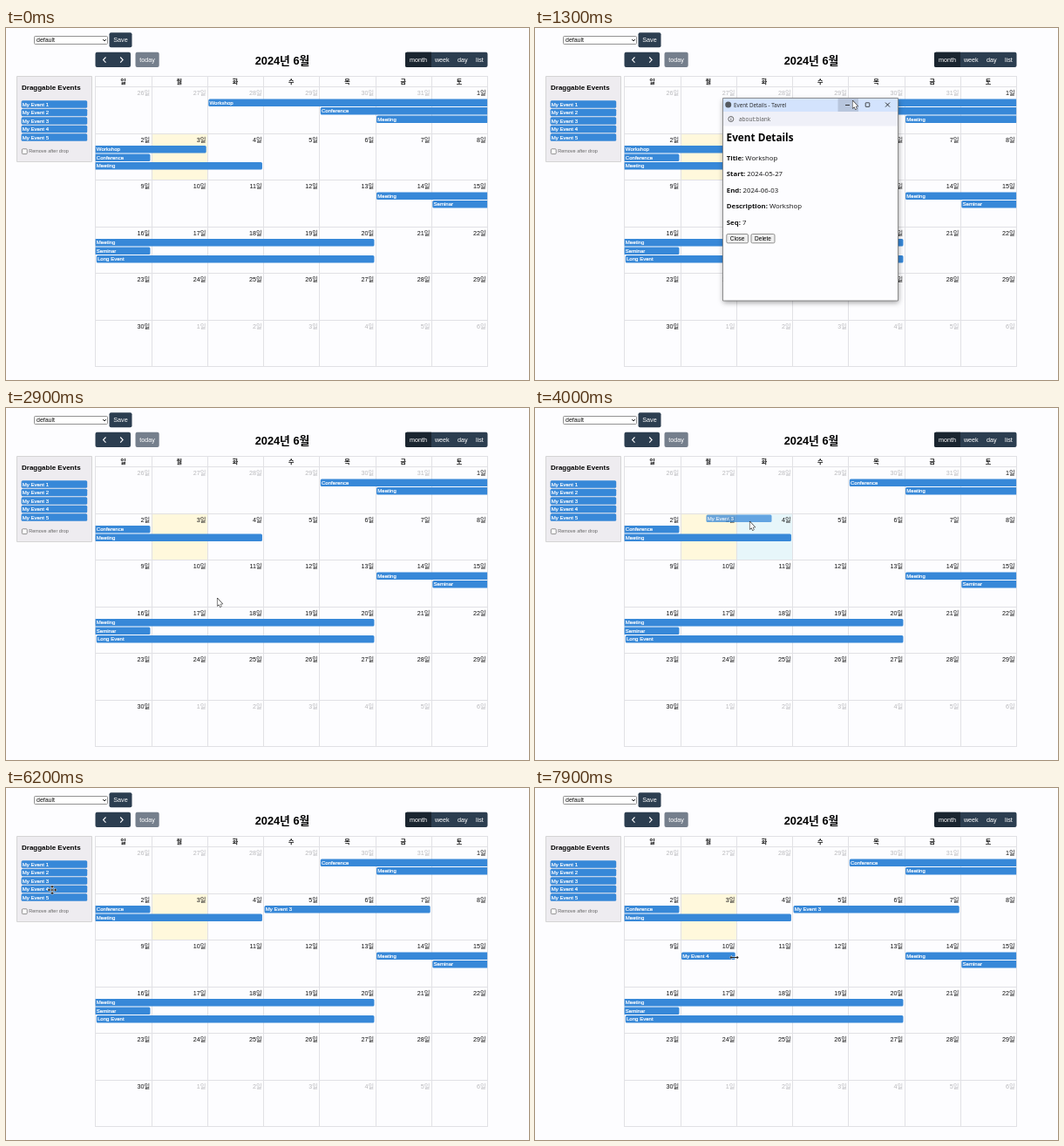
Animation, 600 px wide and 404 px high, one loop 8000 ms. Source, as an HTML page with a canvas:

```html
<!DOCTYPE html>
<html lang="ko">
<head>
<meta charset="utf-8">
<title>Calendar</title>
<style>
html, body { margin: 0; width: 100%; height: 100%; overflow: hidden; background: #fdfdff; }
canvas { display: block; width: 600px; height: 404px; }
</style>
</head>
<body>
<canvas id="stage"></canvas>
<script>
const LOOP = 8000, STEP = 100;
const SANS = '"Liberation Sans", "Noto Sans CJK KR", "Noto Sans CJK JP", sans-serif';
const UI = '"Open Sans", "Noto Sans", sans-serif';
const BG = '#fdfdff', NAVY = '#2c3e50', BLUE = '#3788d8', LINE = '#e1e1e5';
const LEFT = 102.4, TOP = 67.2, COL = 64.25, ROW = 53.5;
const BAR = 8.6, LANE = 9.5;

const canvas = document.getElementById('stage');
const ctx = canvas.getContext('2d');
const dpr = window.devicePixelRatio || 1;
canvas.width = 600 * dpr;
canvas.height = 404 * dpr;
ctx.scale(dpr, dpr);

// Pointer path: time, x, y, shape
const POINTER = [
  [100, 455, 70, 'arrow'], [400, 420, 86, 'arrow'], [700, 515, 62, 'arrow'],
  [900, 476, 68, 'arrow'], [1000, 476, 68, 'arrow'], [1200, 361, 88, 'arrow'],
  [1300, 364, 83, 'arrow'], [1900, 303, 176, 'arrow'], [2500, 259, 237, 'arrow'],
  [2600, 259, 237, 'arrow'], [2900, 242, 218, 'arrow'], [3100, 128, 153, 'arrow'],
  [3200, 128, 153, 'arrow'], [3600, 54, 109, 'move'], [3700, 54, 109, 'move'],
  [3800, 80, 112, 'arrow'], [4000, 246, 130, 'arrow'], [4300, 345, 139, 'arrow'],
  [4600, 362, 140, 'arrow'], [5000, 356, 140, 'resize'], [5100, 356, 140, 'resize'],
  [5600, 482, 140, 'resize'], [5700, 440, 147, 'arrow'], [6000, 267, 175, 'arrow'],
  [6200, 53, 117, 'move'], [6300, 53, 117, 'move'], [6400, 72, 122, 'arrow'],
  [6900, 178, 178, 'arrow'], [7200, 216, 190, 'arrow'], [7400, 221, 191, 'arrow'],
  [7700, 229, 194, 'resize'], [7800, 229, 194, 'resize'], [7900, 228.5, 194.5, 'resize']
];
const POPUP = [[500, 369, 54], [700, 369, 54], [900, 330, 60], [1000, 330, 60], [1200, 215, 80]];
const DRAGS = [
  { label: 'My Event 3', from: 3800, to: 4400,
    path: [[3800, 40, 104], [4000, 196.5, 122.4], [4200, 285, 130], [4300, 300, 132]] },
  { label: 'My Event 4', from: 6400, to: 7400,
    path: [[6400, 36, 114], [6900, 121, 140], [7200, 175, 182], [7300, 178, 184]] }
];

function along(path, t) {
  let i = 0;
  while (i < path.length - 2 && t >= path[i + 1][0]) i++;
  const a = path[i], b = path[i + 1];
  const k = Math.min(1, Math.max(0, (t - a[0]) / (b[0] - a[0])));
  return { x: a[1] + (b[1] - a[1]) * k, y: a[2] + (b[2] - a[2]) * k, shape: k === 1 ? b[3] : a[3] };
}

function box(x, y, w, h, fill, r = 0, stroke) {
  ctx.beginPath();
  ctx.roundRect(x, y, w, h, r);
  if (fill) { ctx.fillStyle = fill; ctx.fill(); }
  if (stroke) { ctx.strokeStyle = stroke; ctx.lineWidth = 0.8; ctx.stroke(); }
}

function text(str, x, y, size, { color = '#111', align = 'left', weight = 400, family = SANS, heavy = 0 } = {}) {
  ctx.font = `${weight} ${size}px ${family}`;
  ctx.textAlign = align;
  ctx.fillStyle = color;
  ctx.fillText(str, x, y);
  if (heavy) {
    ctx.strokeStyle = color;
    ctx.lineWidth = heavy;
    ctx.strokeText(str, x, y);
  }
  return ctx.measureText(str).width;
}

function line(points, color, width = 1) {
  ctx.beginPath();
  points.forEach(([x, y], i) => i ? ctx.lineTo(x, y) : ctx.moveTo(x, y));
  ctx.strokeStyle = color;
  ctx.lineWidth = width;
  ctx.stroke();
}

const snap = v => Math.round(v) + 0.5;
const cellX = c => LEFT + c * COL;
const cellY = r => TOP + r * ROW;

function label(str, x, y) {
  text(str, x + 1.2, y + 6.3, 6.05, { color: '#fff', heavy: 0.2 });
}

function toolbar() {
  box(32.5, 9.5, 84, 9, '#fff', 1, '#767676');
  text('default', 35, 16.4, 7);
  line([[111.2, 13], [113, 15], [114.8, 13]], '#222', 1);
  const caption = (str, x, y = 39) => text(str, x, y, 7.2, { color: '#fff', align: 'center' });
  box(118.5, 5.3, 26, 17, NAVY, 2);
  caption('Save', 131.5, 16.4);
  box(102.5, 27.7, 40.5, 17.2, NAVY, 2);
  line([[114.5, 33.5], [111.6, 36.6], [114.5, 39.7]], '#fff', 1.1);
  line([[131.2, 33.5], [134.1, 36.6], [131.2, 39.7]], '#fff', 1.1);
  box(148.5, 27.7, 27.2, 17.2, '#757f8c', 2);
  caption('today', 162.1);
  text('2024년 6월', 317, 41.5, 12.8, { weight: 700, align: 'center', color: '#000' });
  box(458, 27.7, 94.5, 17.2, NAVY, 2);
  box(458, 27.7, 30, 17.2, '#1a252f', [2, 0, 0, 2]);
  caption('month', 473);
  caption('week', 500.3);
  caption('day', 523.7);
  caption('list', 543.4);
}

function sidebar() {
  box(12.5, 55.5, 86, 98, '#eeecf0', 0, '#ccc');
  text('Draggable Events', 18, 71, 8, { weight: 700, color: '#000' });
  for (let i = 0; i < 5; i++) {
    const y = 83.2 + i * 9.5;
    box(17.6, y, 75.6, BAR, BLUE, 1.5);
    label('My Event ' + (i + 1), 17.6, y);
  }
  box(18.4, 138.8, 5.8, 5.8, '#fff', 1, '#767676');
  text('Remove after drop', 26.2, 143.4, 5.5, { color: '#666' });
}

function grid(hot) {
  box(cellX(1), cellY(1), COL, ROW, '#fff8dc');
  if (hot) box(cellX(hot.col), cellY(hot.row), COL, ROW, 'rgba(188,232,241,.35)');
  for (let i = 0; i <= 7; i++) {
    const x = snap(cellX(i)), y = i < 7 ? snap(cellY(i)) : 55.5;
    line([[x, 55], [x, 389]], LINE);
    line([[102, y], [553, y]], LINE);
  }
  [...'일월화수목금토'].forEach((d, c) =>
    text(d, cellX(c + 0.5), 64.4, 7, { weight: 700, align: 'center' }));
  for (let i = 0; i < 42; i++) {
    const n = i - 5, other = n < 1 || n > 30;
    const day = n < 1 ? n + 31 : n > 30 ? n - 30 : n;
    text(day + '일', cellX(i % 7 + 1) - 1.5, cellY(Math.floor(i / 7)) + 9.8, 7.2,
      { align: 'right', color: other ? '#b9b9bc' : '#111' });
  }
}

// Bar over columns a..b; open ends run on into the neighbouring week
function bar(name, row, lane, a, b, openStart, openEnd) {
  const x = cellX(a) + (openStart ? 0.2 : 1.4);
  const end = cellX(b + 1) - (openEnd ? 0 : 1.2);
  const l = openStart ? 0 : 1.5, r = openEnd ? 0 : 1.5;
  const y = cellY(row) + 14.3 + lane * LANE;
  box(x, y, end - x, BAR, BLUE, [l, r, r, l]);
  label(name, x, y);
}

function events(t, pointer) {
  const full = t < 2700, up = full ? 1 : 0;
  if (full) {
    bar('Workshop', 0, 0, 2, 6, false, true);
    bar('Workshop', 1, 0, 0, 1, true, false);
  }
  bar('Conference', 0, up, 4, 6, false, true);
  bar('Meeting', 0, up + 1, 5, 6, false, true);
  bar('Conference', 1, up, 0, 0, true, false);
  bar('Meeting', 1, up + 1, 0, 2, true, false);
  bar('Meeting', 2, 0, 5, 6, false, true);
  bar('Seminar', 2, 1, 6, 6, false, true);
  bar('Meeting', 3, 0, 0, 4, true, false);
  bar('Seminar', 3, 1, 0, 0, true, false);
  bar('Long Event', 3, 2, 0, 4, false, false);
  if (t >= 4400) {
    const last = t < 5200 ? 3 : t > 5600 ? 5 : Math.floor((pointer.x - LEFT) / COL);
    bar('My Event 3', 1, 0, 3, last, false, false);
  }
  if (t >= 7400) bar('My Event 4', 2, 0, 1, 1, false, false);
}

function popup(t) {
  const p = along(POPUP, t);
  ctx.save();
  ctx.translate(p.x, p.y);
  ctx.shadowColor = 'rgba(0,0,0,.4)';
  ctx.shadowBlur = 6 * dpr;
  ctx.shadowOffsetY = 2 * dpr;
  box(0.5, 0.5, 201, 232.5, BG);
  ctx.shadowColor = 'transparent';
  box(0.5, 0.5, 201, 15.5, '#d3e3fd');
  if (t >= 1200 && t < 1400) box(132.5, 0.8, 23.5, 15.2, '#b8c6dd');
  box(0.5, 16, 201, 16.5, '#eff0f8');
  box(0.5, 0.5, 201, 232.5, null, 0, '#777');

  box(3.2, 4.4, 7, 7, '#555a60', 3.5);
  text('Event Details - Tavrel', 13, 10.7, 6.3, { family: UI, color: '#222' });
  line([[141, 8.5], [146, 8.5]], '#222', 0.9);
  box(164.2, 5.8, 4.6, 4.6, null, 0.5, '#222');
  line([[187, 5.6], [192, 10.6]], '#222', 0.9);
  line([[192, 5.6], [187, 10.6]], '#222', 0.9);
  box(6.8, 21.5, 6, 6, null, 3, '#444');
  line([[9.8, 24.2], [9.8, 26.3]], '#444', 0.8);
  line([[9.8, 22.8], [9.8, 23.5]], '#444', 0.8);
  text('about:blank', 19, 27, 6.5, { family: UI, color: '#555' });

  text('Event Details', 4.6, 50.3, 11.75, { family: UI, weight: 700, color: '#000' });
  [['Title:', 'Workshop'], ['Start:', '2024-05-27'], ['End:', '2024-06-03'],
    ['Description:', 'Workshop'], ['Seq:', '7']].forEach(([key, value], i) => {
    const y = 71.6 + i * 18.5;
    const w = text(key + ' ', 4.8, y, 7.8, { family: UI, weight: 700 });
    text(value, 4.8 + w, y, 7.8, { family: UI });
  });
  for (const [name, x, w] of [['Close', 4.8, 24.7], ['Delete', 33, 27]]) {
    box(x, 156.5, w, 10.3, '#efefef', 1.5, '#767676');
    text(name, x + w / 2, 164, 6.5, { align: 'center', color: '#000' });
  }
  ctx.restore();
}

function mirror(drag, t) {
  const p = along(drag.path, t);
  ctx.globalAlpha = 0.75;
  box(p.x, p.y, 75, BAR, BLUE, 1.5);
  label(drag.label, p.x, p.y);
  ctx.globalAlpha = 1;
}

function shape(path, fill, stroke, width) {
  const p = new Path2D(path);
  ctx.lineJoin = 'round';
  ctx.strokeStyle = stroke;
  ctx.lineWidth = width;
  ctx.stroke(p);
  ctx.fillStyle = fill;
  ctx.fill(p);
  ctx.lineJoin = 'miter';
}

function cursor({ x, y, shape: kind }) {
  ctx.save();
  ctx.translate(x, y);
  if (kind === 'arrow') {
    shape('M.5 .5V9L2.4 7.2 3.7 10.2 5 9.6 3.8 6.8H6.4Z', '#fff', '#222', 1.1);
  } else {
    const turns = kind === 'move' ? [0, 1, 2, 3] : [0, 2];
    for (const n of turns) {
      ctx.save();
      ctx.rotate(n * Math.PI / 2);
      shape('M0 -.4H3V-2L5.2 0 3 2V.4H0Z', '#222', '#fff', 1);
      ctx.restore();
    }
    box(-1, -0.4, 2, 0.8, '#222');
  }
  ctx.restore();
}

function draw(t) {
  const pointer = along(POINTER, t);
  const drag = DRAGS.find(d => t >= d.from && t < d.to);
  const hot = drag && pointer.x > LEFT && pointer.y > TOP && {
    col: Math.floor((pointer.x - LEFT) / COL),
    row: Math.floor((pointer.y - TOP) / ROW)
  };
  box(0, 0, 600, 404, BG);
  toolbar();
  sidebar();
  grid(hot);
  events(t, pointer);
  if (t >= 500 && t < 2700) popup(t);
  if (drag) mirror(drag, t);
  if (t >= 100) cursor(pointer);
}

let start;
function frame(now) {
  start ??= now;
  const t = Math.max(0, now - start) % LOOP;
  draw(Math.floor(t / STEP) * STEP);
  requestAnimationFrame(frame);
}
draw(0);
requestAnimationFrame(frame);
</script>
</body>
</html>
```
